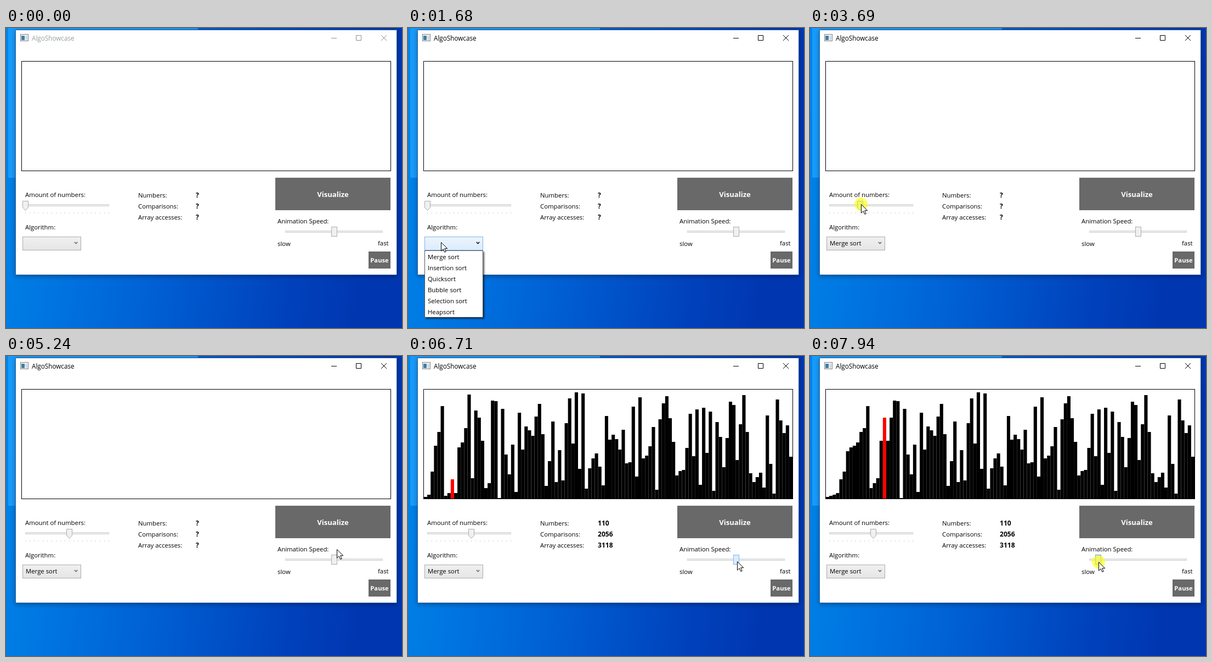
An HTML page that plays this animation: 722x545 px, repeating every 8000 ms.

```html
<!DOCTYPE html>
<html lang="en">
<head>
<meta charset="utf-8">
<title>AlgoShowcase</title>
<style>
html, body { margin: 0; width: 100%; height: 100%; overflow: hidden; background: #0060d4; }
svg { display: block; }
text { font: 11.35px "Open Sans", "Noto Sans", sans-serif; fill: #000; }
.value { font-size: 12.1px; font-weight: 700; }
.label { font-weight: 700; fill: #fff; text-anchor: middle; }
.track { fill: #e7eaea; stroke: #d6d6d6; }
.thumb { fill: #f0f0f0; stroke: #acacac; }
.thumb.hover { fill: #dcecfc; stroke: #7eb4ea; }
.thumb.down { fill: #daecfc; stroke: #569de5; }
#title { font-size: 11.7px; fill: #95a095; }
#controls { fill: none; stroke: #8e8e8e; }
.active #title { fill: #000; }
.active #controls { stroke: #000; }
#combo { fill: url(#plain); stroke: #acacac; }
#combo.hover { fill: url(#lit); stroke: #7eb4ea; }
#chevron { fill: none; stroke: #606060; stroke-width: 1.4; }
#combo.hover + #chevron { stroke: #000; }
#go { fill: #696969; }
#go.hover { fill: #bee6fd; stroke: #3c7fb1; }
#go.down { fill: #c4e5f6; stroke: #2c628b; }
</style>
</head>
<body>
<svg id="stage" width="722" height="545" viewBox="0 0 722 545">
  <defs>
    <linearGradient id="sky" x2="1" y2="0.12">
      <stop offset="0" stop-color="#0086ea"/>
      <stop offset="0.4" stop-color="#0066d8"/>
      <stop offset="0.8" stop-color="#0042bc"/>
      <stop offset="1" stop-color="#0036b0"/>
    </linearGradient>
    <linearGradient id="plain" x2="0" y2="1">
      <stop stop-color="#f0f0f0"/><stop offset="1" stop-color="#e5e5e5"/>
    </linearGradient>
    <linearGradient id="lit" x2="0" y2="1">
      <stop stop-color="#ecf4fc"/><stop offset="1" stop-color="#dcecfc"/>
    </linearGradient>
    <filter id="shade" x="-10%" y="-10%" width="120%" height="120%">
      <feDropShadow dx="0" dy="2" stdDeviation="4" flood-opacity="0.35"/>
    </filter>
    <filter id="popShade" x="-10%" y="-10%" width="125%" height="120%">
      <feDropShadow dx="2.5" dy="2.5" stdDeviation="1.2" flood-opacity="0.5"/>
    </filter>
  </defs>

  <rect width="722" height="545" fill="url(#sky)"/>
  <rect x="4" y="-74" width="346" height="346" fill="#189afa"/>

  <rect x="17.5" y="3.5" width="695" height="445" fill="#fff" stroke="#2a5f9e" filter="url(#shade)"/>
  <g>
    <rect x="26.5" y="11.5" width="14" height="12" fill="#f4f4f4" stroke="#7d8388"/>
    <rect x="28" y="14" width="6" height="8" fill="#3f7fa8"/>
    <rect x="35" y="14" width="4" height="8" fill="#d5d9dc"/>
  </g>
  <text id="title" x="47" y="23">AlgoShowcase</text>
  <path id="controls" d="M593 18.5h10M638.5 13.5h9v9h-9zM684 13l10 10M694 13l-10 10"/>

  <g id="bars"></g>
  <rect x="28.5" y="60.5" width="673" height="199" fill="none" stroke="#000"/>

  <text x="35" y="307">Amount of numbers:</text>
  <rect class="track" x="35.5" y="320.5" width="152" height="3"/>
  <path id="ticks" stroke="#e2e2e2"/>
  <path id="amount" class="thumb" d="M-5 314.5h10v11.5l-5 5.5l-5-5.5z"/>

  <text x="35" y="366">Algorithm:</text>
  <rect id="combo" x="30.5" y="379.5" width="106" height="24"/>
  <path id="chevron" d="M124.8 388.8l2.7 3l2.7-3"/>
  <text id="choice" x="36" y="395"></text>

  <text x="241" y="308">Numbers:</text>
  <text x="241" y="328">Comparisons:</text>
  <text x="241" y="348">Array accesses:</text>
  <text class="value" x="346" y="308"></text>
  <text class="value" x="346" y="328"></text>
  <text class="value" x="346" y="348"></text>

  <rect id="go"/>
  <text class="label" x="596" y="307" style="font-size:13.1px">Visualize</text>

  <text x="495" y="355">Animation Speed:</text>
  <rect class="track" x="509.5" y="368.5" width="177" height="3"/>
  <rect id="speed" class="thumb" x="-5" y="361.5" width="10" height="17"/>
  <text x="495" y="396">slow</text>
  <text x="678" y="395">fast</text>
  <rect x="661" y="406" width="40" height="31" fill="#696969"/>
  <text class="label" x="681" y="426" style="font-size:11.2px">Pause</text>

  <g id="popup" filter="url(#popShade)">
    <rect id="sheet" x="30.5" y="404.5" width="106" height="121" fill="#fff" stroke="#555"/>
    <rect id="pick" x="32.5" y="406.5" width="102" height="19" fill="#dcf0fb" stroke="#26a0da"/>
    <g id="items"></g>
  </g>

  <circle id="halo" r="12" fill="#ff0" fill-opacity="0.6"/>
  <path id="cursor" d="M.5.5v15.6l3.7-3.5l2.6 5.8l2.4-1.1l-2.5-5.6h5z" fill="#fff" stroke="#000"/>
</svg>
<script>
const NS = 'http://www.w3.org/2000/svg';
const $ = id => document.getElementById(id);
const add = (parent, name, attrs) => {
  const el = document.createElementNS(NS, name);
  set(el, attrs);
  parent.appendChild(el);
  return el;
};
function set(el, attrs) {
  for (const key in attrs) el.setAttribute(key, attrs[key]);
}
const show = (el, on) => { el.style.display = on ? '' : 'none'; };
const move = (el, x, y = 0) => el.setAttribute('transform', `translate(${x} ${y})`);

// y of each bar's upper edge, before sorting
const tops = [
  210, 256, 91, 252, 163, 138, 224, 173, 254, 166, 249, 157, 131, 70, 222, 99, 112, 154, 240, 231,
  81, 82, 258, 96, 179, 215, 161, 247, 103, 170, 128, 135, 145, 110, 87, 142, 236, 191, 119, 229,
  171, 226, 122, 77, 159, 66, 205, 68, 241, 204, 186, 177, 201, 235, 109, 152, 143, 151, 170, 134,
  195, 193, 92, 219, 75, 186, 181, 164, 129, 243, 115, 86, 73, 113, 156, 217, 209, 207, 167, 105,
  182, 97, 234, 94, 176, 101, 245, 120, 147, 202, 149, 83, 89, 189, 124, 71, 138, 213, 229, 220,
  212, 239, 108, 196, 250, 79, 117, 140, 126, 183
];

// every write of a merge sort, in order
const writes = [];
function mergeSort(list, lo) {
  if (list.length < 2) return list;
  const mid = list.length >> 1;
  const a = mergeSort(list.slice(0, mid), lo);
  const b = mergeSort(list.slice(mid), lo + mid);
  const out = [];
  while (a.length || b.length) {
    const v = !b.length || (a.length && a[0] >= b[0]) ? a.shift() : b.shift();
    writes.push([lo + out.length, v]);
    out.push(v);
  }
  return out;
}
mergeSort(tops, 0);

const barW = 672 / tops.length;
const bars = tops.map((_, i) => add($('bars'), 'rect', { x: 29 + i * barW, width: barW }));
const values = [...document.querySelectorAll('.value')];
['Merge', 'Insertion', 'Quick', 'Bubble', 'Selection', 'Heap'].forEach((name, i) => {
  const joined = name === 'Quick' || name === 'Heap';
  add($('items'), 'text', { x: 36, y: 420 + 20 * i }).textContent = name + (joined ? 'sort' : ' sort');
});
set($('ticks'), { d: Array.from({ length: 20 }, (_, i) => `M${35.5 + 8 * i} 334v4`).join('') });

// bursts of screen updates: start time and number of steps
const STEP = 77;
const bursts = [[0, 1], [1060, 4], [1520, 3], [1920, 6], [2460, 11], [3380, 9], [4150, 4],
  [4700, 11], [5620, 3], [5940, 11], [6780, 11], [7630, 5]];
function snap(t) {
  const [start, steps] = bursts.filter(b => b[0] <= t).pop();
  return start + STEP * Math.min(steps - 1, Math.floor((t - start + 8) / STEP));
}

// pointer path: time, x, y
const path = [[1060, 26, 387], [1291, 60, 388], [1920, 60, 390], [2305, 67, 411], [2537, 67, 411],
  [2900, 50, 370], [3230, 36, 316], [3380, 36, 316], [3457, 42, 317], [3688, 93, 320],
  [3842, 123, 320], [3996, 117, 320], [4150, 117, 320], [4381, 123, 323], [4700, 135, 328],
  [5008, 420, 384], [5162, 570, 372], [5239, 603, 351], [5470, 608, 329], [5620, 608, 329],
  [5774, 609.5, 322], [5940, 609, 328], [6402, 602, 370], [6710, 599.5, 373], [6857, 599, 373],
  [7550, 564, 374], [7938, 526, 374]];
function pointer(t) {
  const i = path.findIndex(p => p[0] > t);
  if (i < 0) return path[path.length - 1].slice(1);
  if (i === 0) return path[0].slice(1);
  const a = path[i - 1], b = path[i], f = (t - a[0]) / (b[0] - a[0]);
  return [a[1] + (b[1] - a[1]) * f, a[2] + (b[2] - a[2]) * f];
}

function drawBars(t) {
  const on = t >= 5690;
  show($('bars'), on);
  ['110', '2056', '3118'].forEach((s, i) => { values[i].textContent = on ? s : '?'; });
  if (!on) return;
  const k = Math.round((t - 6710) / STEP);
  const n = Math.ceil(32 + k * (k < 0 ? 2.25 : 2.1875));
  const now = tops.slice();
  for (const [i, v] of writes.slice(0, n)) now[i] = v;
  const red = writes[n - 1][0];
  bars.forEach((bar, i) => set(bar, {
    y: now[i], height: 259 - now[i], fill: i === red ? '#f00' : '#000'
  }));
}

function draw(time) {
  const t = snap(time);
  const [x, y] = pointer(t);
  const within = (from, to) => t >= from && t < to;
  const over = (l, top, r, b) => t >= 1060 && x >= l && x <= r && y >= top && y <= b;
  const state = (el, hover, down) => {
    el.classList.toggle('hover', hover);
    el.classList.toggle('down', down);
  };

  $('stage').classList.toggle('active', t >= 1520);
  show($('cursor'), t >= 1060);
  move($('cursor'), Math.round(x), Math.round(y));
  show($('halo'), within(1520, 1590) || within(2460, 2530) || within(3380, 4150) ||
    within(5620, 5690) || t >= 6780);
  move($('halo'), x, y);

  const open = within(1590, 2530);
  state($('combo'), open || over(24, 379, 137, 404), false);
  $('choice').textContent = t >= 2530 ? 'Merge sort' : '';
  show($('popup'), open);
  const tall = t < 1670 ? 61 : 121;
  set($('sheet'), { height: tall });
  [...$('items').children].forEach((el, i) => show(el, 20 * i + 20 < tall));
  show($('pick'), open && y > 405);

  const dragX = t < 3380 ? 36 : t < 4150 ? x : 117;
  const amountX = 35.5 + 8 * Math.round((dragX - 35.5) / 8);
  move($('amount'), amountX);
  state($('amount'), over(amountX - 5, 314, amountX + 5, 331), within(3380, 4150));

  const speedX = t < 6780 ? 598.5 : Math.round(x - 1) + 0.5;
  move($('speed'), speedX);
  state($('speed'), over(speedX - 5, 361, speedX + 5, 379), t >= 6780);

  const hot = over(491, 272, 701, 331);
  state($('go'), hot, within(5620, 5690));
  set($('go'), hot ? { x: 490.5, y: 271.5, width: 211, height: 60 }
    : { x: 491, y: 272, width: 210, height: 59 });

  drawBars(t);
}

const begin = performance.now();
function tick() {
  draw((performance.now() - begin) % 8000);
  requestAnimationFrame(tick);
}
tick();
</script>
</body>
</html>
```
